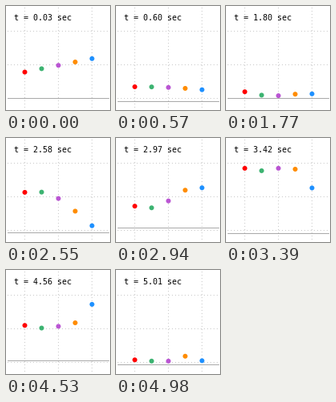
A matplotlib script for the animation above (5010 ms loop, 130x130 px).

```python
import math

import matplotlib.pyplot as plt
from matplotlib.animation import FuncAnimation
from matplotlib.patches import Circle

SIZE, DPI = 130, 100
FRAMES, STEP_MS = 167, 30
DURATION = FRAMES * STEP_MS / 1000
PX = 72 / DPI  # one pixel in points

G, AMP, OMEGA = 9.8, 0.1, 7.0
UNIT, X0, Y0 = 42, 65.5, 116  # pixels per metre, pixel origin
COLORS = ["red", "mediumseagreen", "mediumorchid", "darkorange", "dodgerblue"]
STARTS = [0.8, 0.9, 1.0, 1.1, 1.2]


def floor_at(t):
    return AMP * math.sin(OMEGA * t)


def floor_speed(t):
    return AMP * OMEGA * math.cos(OMEGA * t)


def height(arc, t):
    start, h, v = arc
    d = t - start
    return h + v * d - G * d * d / 2


def bounce_arcs(h):
    """Free-flight arcs (start, height, speed) between elastic bounces."""
    arcs = [(0.0, h, 0.0)]
    dt = 0.002
    t = dt
    while t < DURATION + dt:
        arc = arcs[-1]
        if height(arc, t) >= floor_at(t):
            t += dt
            continue
        lo, hi = t - dt, t
        for _ in range(40):
            mid = (lo + hi) / 2
            if height(arc, mid) >= floor_at(mid):
                lo = mid
            else:
                hi = mid
        v = arc[2] - G * (lo - arc[0])
        arcs.append((lo, floor_at(lo), 2 * floor_speed(lo) - v))
        t = lo + dt
    return arcs


def ball_height(arcs, t):
    return height([a for a in arcs if a[0] <= t][-1], t)


def to_y(h):
    return Y0 - UNIT * h


def pixel_row(h):
    """Centre of the pixel row that holds height h."""
    return math.ceil(to_y(h)) - 0.5


fig = plt.figure(figsize=(SIZE / DPI, SIZE / DPI), dpi=DPI, facecolor="white")
ax = fig.add_axes([0, 0, 1, 1])
ax.set_xlim(0, SIZE)
ax.set_ylim(SIZE, 0)
ax.axis("off")

grid = dict(color="#c8c8c8", lw=PX, ls=(0, (1, 3)), snap=False, zorder=1)
for k in range(3):
    ax.plot([X0 + UNIT * (k - 1)] * 2, [2, 129], **grid)
    ax.plot([2, 129], [pixel_row(k)] * 2, **grid)

(ground,) = ax.plot([2, 129], [Y0, Y0], color="#a9a9a9", lw=PX,
                    solid_capstyle="butt", snap=False, zorder=2)
label = ax.text(10, 18, "", family="DejaVu Sans Mono", size=10 * PX,
                color="black", va="baseline", zorder=4)

paths = [bounce_arcs(h) for h in STARTS]
balls = []
for i, color in enumerate(COLORS):
    ball = Circle((X0 + UNIT * (i - 2) / 2, 0), 3, fc=color, lw=0, zorder=3)
    balls.append(ax.add_patch(ball))


def update(n):
    t = (n + 1) * STEP_MS / 1000
    label.set_text(f"t = {t:.2f} sec")
    ground.set_ydata([pixel_row(floor_at(t))] * 2)
    for ball, arcs in zip(balls, paths):
        ball.center = (ball.center[0], to_y(ball_height(arcs, t)))
    return [ground, label, *balls]


anim = FuncAnimation(fig, update, frames=FRAMES, interval=STEP_MS, repeat=True)
plt.show()
```
